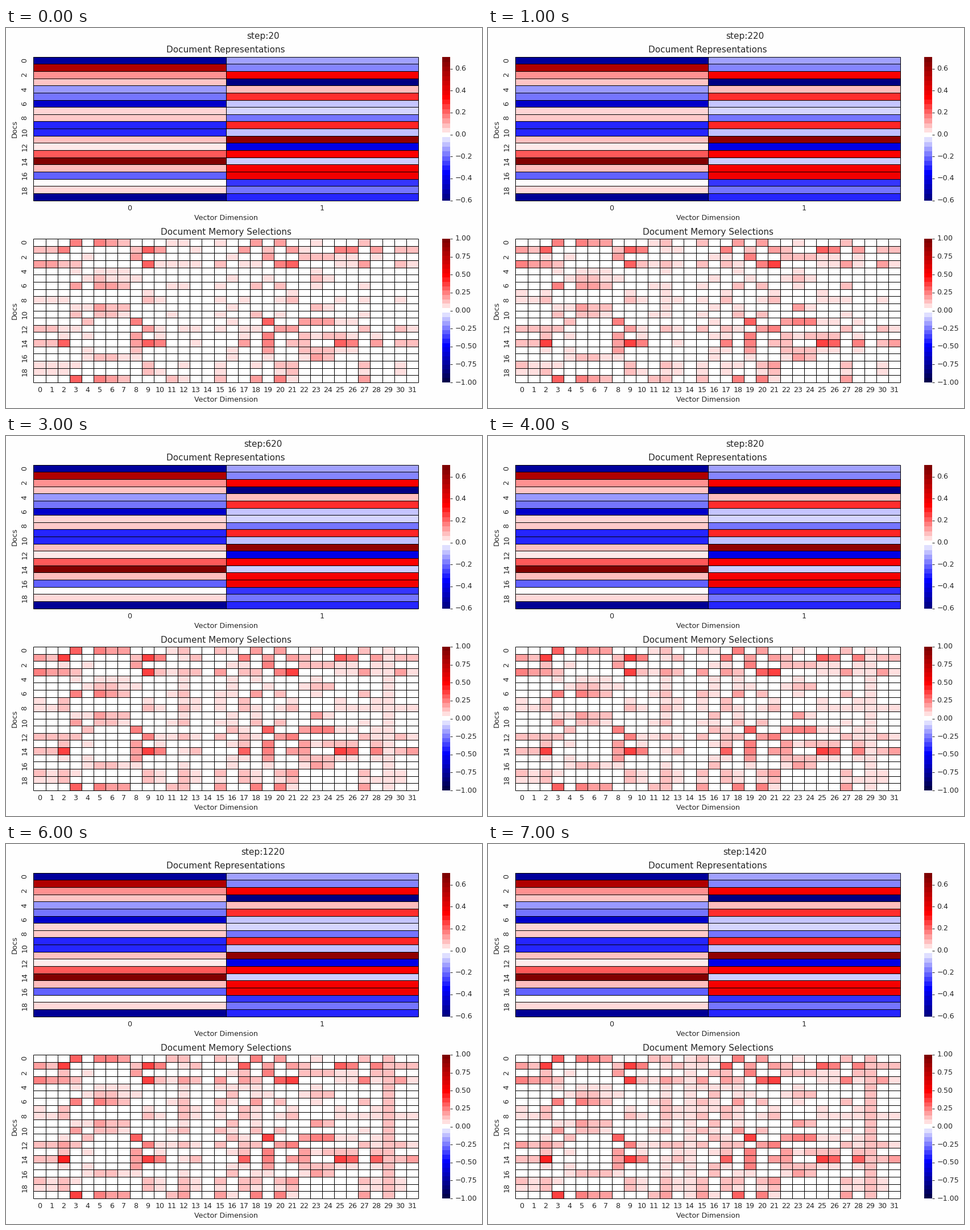
Animation, 837 px wide and 669 px high, one loop 8000 ms. Source, as a matplotlib script:

```python
import numpy as np
import matplotlib.pyplot as plt
from matplotlib.animation import FuncAnimation
from matplotlib.lines import Line2D

W, H, DPI = 837, 669, 64
PX = 72 / DPI  # points per pixel
LEFT, RIGHT, TALL = 48.4, 725, 253
INK = "#262626"
STEPS, SLOTS = 8, 32

plt.rcParams["font.family"] = "DejaVu Sans"
SMOOTH = plt.get_cmap("seismic")
BANDED = plt.get_cmap("seismic", 33)

# Two-dimensional vector of each document.
DOCS = np.array([
    (-.55, -.13), (.575, -.17), (.15, .37), (.08, -.6), (-.14, .09),
    (-.19, .29), (-.455, -.08), (.06, -.06), (.075, -.19), (-.3, .3),
    (-.3, -.085), (.085, .66), (.03, -.4), (.23, .36), (.7, -.07),
    (.09, .38), (-.22, .39), (0, -.28), (.055, -.19), (-.56, -.3),
])

# Slots that share a direction: angle, strongest weight, falloff, members.
FAMILIES = [
    (-74, .57, 0, [21]),
    (-64, .38, .055, [0, 1, 30]),
    (-49, .66, .52, [9, 13]),
    (-17, .43, .065, [2, 10, 17, 31]),
    (0, .51, .1, [25, 26, 28]),
    (48, .58, .11, [19, 8, 22]),
    (82, .34, .17, [24, 4]),
    (117, .39, .24, [23, 16]),
    (170, .48, .09, [5, 6, 7]),
    (212, .5, .17, [3, 18, 11]),
    (248, .5, .12, [20, 27, 15, 12]),
]

# Bias gained in training: final amount, easing power, members.
DRIFT = [
    (.09, .25, [2, 12, 17]),
    (.05, 1, [13, 15, 16, 18, 28]),
    (.11, 1, [29]),
    (.035, 2, [14]),
]


def slot_weights():
    w = np.zeros((2, SLOTS))
    for angle, lead, fall, members in FAMILIES:
        a = np.radians(angle)
        for k, slot in enumerate(members):
            w[:, slot] = (lead - fall * k) * np.array([np.cos(a), np.sin(a)])
    return w


WEIGHTS = slot_weights()


def memory(i):
    """Rectified linear response of every slot to every document."""
    p = i / (STEPS - 1)
    bias = np.zeros(SLOTS)
    for amount, power, members in DRIFT:
        bias[members] = amount * p ** power
    growth = .93 + .14 * p ** .4
    return np.maximum(DOCS @ WEIGHTS * growth + bias, 0)


fig = plt.figure(figsize=(W / DPI, H / DPI), dpi=DPI, facecolor="#fefefe")


def write(x, y, s, size=12.6, **kw):
    kw = {"ha": "center", "va": "center", **kw}
    return fig.text(x / W, 1 - y / H, s, fontsize=size * PX, color=INK, **kw)


def rule(x0, y0, x1, y1, color="black"):
    fig.add_artist(Line2D([x0 / W, x1 / W], [1 - y0 / H, 1 - y1 / H],
                          color=color, linewidth=PX, solid_capstyle="butt"))


def panel(x0, y0, x1, y1):
    ax = fig.add_axes([x0 / W, 1 - y1 / H, (x1 - x0) / W, (y1 - y0) / H])
    ax.axis("off")
    return ax


def heatmap(data, top, title, cmap, lim):
    bottom = top + TALL
    rows, cols = data.shape
    ys = np.linspace(top, bottom, rows + 1)
    xs = np.linspace(LEFT, RIGHT, cols + 1)
    ax = panel(LEFT, top, RIGHT, bottom)
    mesh = ax.pcolormesh(data, cmap=cmap, vmin=-lim, vmax=lim)
    ax.set_xlim(0, cols)
    ax.set_ylim(rows, 0)
    for y in ys:
        rule(LEFT, y, RIGHT, y)
    for x in xs:
        rule(x, top, x, bottom)
    for r in range(0, rows, 2):
        write(33, (ys[r] + ys[r + 1]) / 2, str(r), rotation=90)
    for c in range(cols):
        write((xs[c] + xs[c + 1]) / 2, bottom + 13.5, str(c))
    mid = (LEFT + RIGHT) / 2
    write(mid, top - 7.3, title, 15.2, va="baseline")
    write(mid, bottom + 34.3, "Vector Dimension", va="baseline")
    write(15, top + TALL / 2, "Docs", rotation=90)
    return mesh


def colorbar(top, lo, hi, lim, ticks, digits):
    bottom = top + TALL
    ax = panel(767, top, 780.5, bottom)
    ramp = np.linspace(lo, hi, 2 * TALL)[:, None]
    ax.imshow(ramp, cmap=BANDED, vmin=-lim, vmax=lim, aspect="auto",
              origin="lower", interpolation="nearest")
    for t in ticks:
        y = bottom - (t - lo) / (hi - lo) * TALL
        rule(780.5, y, 785, y, INK)
        label = f"{t:.{digits}f}".replace("-", "\u2212")
        write(789.5, y, label, ha="left")


TOP, LOW = 50.6, 371
heatmap(DOCS, TOP, "Document Representations", SMOOTH, .709)
cells = heatmap(memory(0), LOW, "Document Memory Selections", BANDED, 1)
colorbar(TOP, -.6, .709, .709, np.arange(-3, 4) / 5, 1)
colorbar(LOW, -1, 1, 1, np.arange(-4, 5) / 4, 2)
step = write(451.5, 19, "", 15.2, va="baseline")


def draw(i):
    cells.set_array(memory(i))
    step.set_text(f"step:{20 + 200 * i}")
    return cells, step


anim = FuncAnimation(fig, draw, frames=STEPS, init_func=lambda: draw(0),
                     interval=1000, repeat=True, repeat_delay=0)
plt.show()
```
